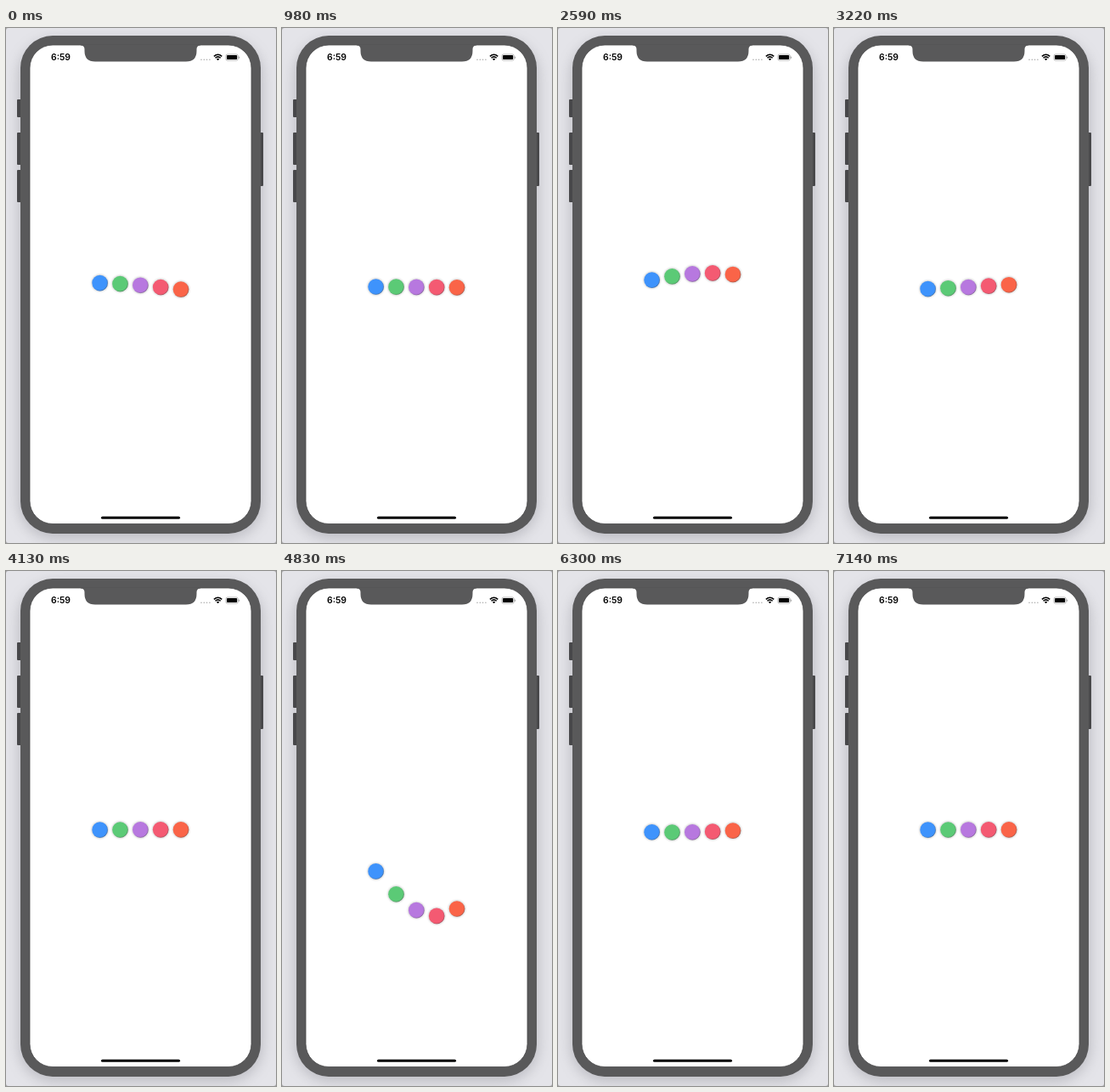
Animation, 318 px wide and 606 px high, one loop 7.21 s. Source, as an HTML page:

```html
<!DOCTYPE html>
<html lang="en">
<head>
<meta charset="utf-8">
<title>Bouncing dots</title>
<style>
  html, body { margin: 0; width: 100%; height: 100%; overflow: hidden; background: #a5a5aa; }
  svg { display: block; }
  text { font: 600 10.4px Inter, "Liberation Sans", sans-serif; }
</style>
</head>
<body>
<svg width="318" height="606" viewBox="0 0 318 606">
  <defs>
    <filter id="soft" x="-20%" y="-20%" width="140%" height="140%"><feGaussianBlur stdDeviation="8"/></filter>
    <filter id="halo" x="-30%" y="-30%" width="160%" height="160%"><feGaussianBlur stdDeviation=".8"/></filter>
    <linearGradient id="edge" x1="0" y1="0" x2="1" y2="1">
      <stop offset=".45" stop-color="#444" stop-opacity="0"/>
      <stop offset="1" stop-color="#444" stop-opacity=".6"/>
    </linearGradient>
  </defs>

  <rect width="318" height="606" rx="3" fill="#e4e4e9"/>
  <rect x="15" y="14" width="287" height="587" rx="42" fill="#77777f" opacity=".36" filter="url(#soft)"/>

  <g fill="#48484a">
    <rect x="13" y="84" width="6" height="21" rx="1"/>
    <rect x="13" y="123" width="6" height="38" rx="1"/>
    <rect x="13" y="167" width="6" height="38" rx="1"/>
    <rect x="298" y="123" width="5" height="63" rx="1"/>
  </g>
  <rect x="17" y="9" width="283" height="586" rx="38" fill="#59595a"/>
  <rect x="28" y="20" width="261" height="563.5" rx="27" fill="#fff" stroke="#4a4a4b" stroke-width=".8"/>
  <path d="M88 19.4H229V20.4Q224.500 20.500 224.500 25V27Q224.500 39.500 212 39.500H105Q92.500 39.500 92.500 27V25Q92.500 20.500 88 20.400Z" fill="#59595a"/>

  <text x="53" y="38.400">6:59</text>
  <g fill="#aaa">
    <circle cx="230" cy="37.300" r=".8"/>
    <circle cx="233.300" cy="37.300" r=".8"/>
    <circle cx="236.600" cy="37.300" r=".8"/>
    <circle cx="239.900" cy="37.300" r=".8"/>
  </g>
  <g fill="none" stroke="#000" stroke-width="1.500">
    <path d="M244.900 33.400Q249.600 29.200 254.300 33.400"/>
    <path d="M246.500 35.200Q249.600 32.500 252.700 35.200"/>
  </g>
  <path d="M247.900 36.500Q249.600 35.100 251.300 36.500L249.600 38.300Z"/>
  <rect x="258.900" y="31" width="14.400" height="7.200" rx="2" fill="#fff" stroke="#999" stroke-width=".7"/>
  <rect x="260" y="32.100" width="12.200" height="5" rx="1"/>
  <rect x="274.200" y="33.400" width="1" height="2.400" rx=".5" fill="#999"/>

  <g id="dots"></g>
  <rect x="112" y="574.700" width="93" height="3" rx="1.500"/>
</svg>

<script>
  const LOOP = 7210, STEP = 70, LEAD = 8;
  const REST = 304.8, LIFT = 120;
  const HALF = 255;      // half a swing of the spring, ms
  const DAMP = 0.193;    // decay per radian
  const STAGGER = 31;    // delay from dot to dot, ms
  const STARTS = [4228, 1225, -1764];
  const COLORS = ['#3e93fc', '#5bca76', '#b778df', '#f45a72', '#fa6448'];

  const group = document.getElementById('dots');

  function addShape(parent, attrs) {
    const el = document.createElementNS('http://www.w3.org/2000/svg', attrs.r ? 'circle' : 'g');
    for (const key in attrs) el.setAttribute(key, attrs[key]);
    return parent.appendChild(el);
  }

  const dots = COLORS.map(fill => {
    const dot = addShape(group, {});
    addShape(dot, { r: 10, fill: '#777', opacity: .38, filter: 'url(#halo)' });
    addShape(dot, { r: 9.3, fill });
    addShape(dot, { r: 9, fill: 'none', stroke: 'url(#edge)', 'stroke-width': .9 });
    return dot;
  });

  // Damped swing: 1 at the start, with no speed.
  function swing(ms) {
    const a = ms / HALF * Math.PI;
    return Math.exp(-DAMP * a) * (Math.cos(a) + DAMP * Math.sin(a));
  }

  // Spring up past the lift height, then let go at the top.
  function offset(ms) {
    if (ms < HALF) return -LIFT * (1 - swing(ms));
    return -LIFT * (1 - swing(HALF)) * swing(ms - HALF);
  }

  function draw(time) {
    dots.forEach((dot, i) => {
      const t = time - i * STAGGER;
      const start = STARTS.find(s => s <= t);
      const y = REST + offset(t - start);
      dot.setAttribute('transform', `translate(${110.6 + i * 23.85} ${y.toFixed(2)})`);
    });
  }

  const begin = performance.now();
  function tick() {
    const t = (performance.now() - begin + LEAD) % LOOP;
    draw(Math.floor(t / STEP) * STEP);
    requestAnimationFrame(tick);
  }
  tick();
</script>
</body>
</html>
```
